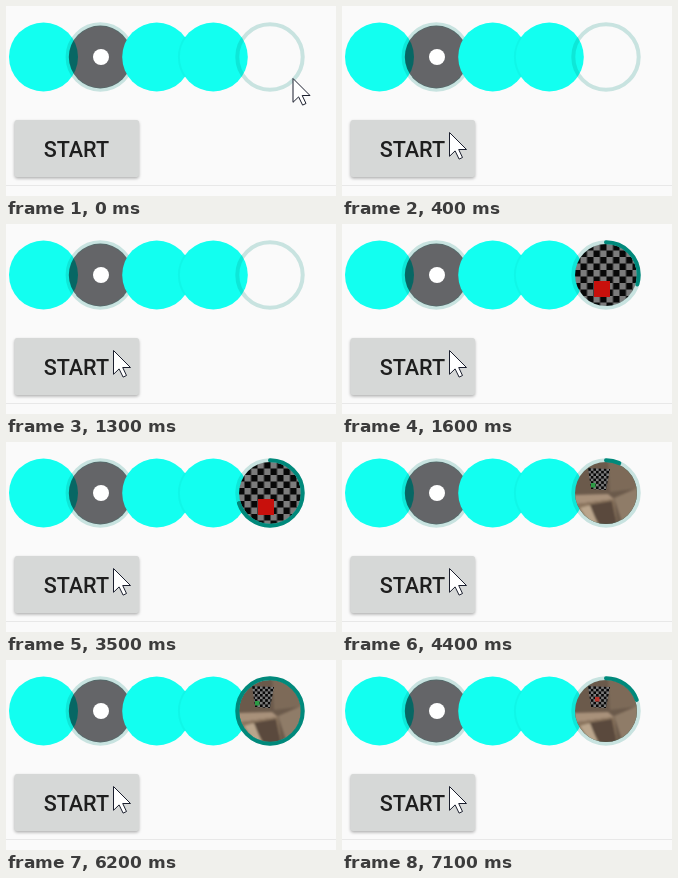
Write an HTML page that moves like this. It is 330 px wide and 190 px high and loops after 8 s.

```html
<!DOCTYPE html>
<html lang="en">
<head>
<meta charset="utf-8">
<style>
  html, body { margin: 0; width: 100%; height: 100%; overflow: hidden; background: #fafafa; }
  svg { display: block; width: 330px; height: 190px; }
  .cyan { fill: #12fff0; }
  .track { fill: none; stroke: #00897b; stroke-opacity: .2; stroke-width: 4; }
  text { font: 500 21.6px Roboto, sans-serif; fill: #1e1e1e; }
</style>
</head>
<body>
<svg viewBox="0 0 330 190">
  <defs>
    <pattern id="checker" x="238.5" y="20" width="13" height="13" patternUnits="userSpaceOnUse">
      <path fill="#080808" d="M0 0h13v13h-13z"/>
      <path fill="#7c7c7c" d="M0 0h6.5v6.5h-6.5zM6.5 6.5h6.5v6.5h-6.5z"/>
    </pattern>
    <pattern id="mesh" href="#checker" patternTransform="scale(.4)"/>
    <clipPath id="disc"><circle cx="264" cy="51" r="31"/></clipPath>
    <clipPath id="face"><rect x="8.5" y="114" width="124.5" height="57" rx="2.5"/></clipPath>
    <filter id="blur"><feGaussianBlur stdDeviation="1.4"/></filter>
    <filter id="soft"><feGaussianBlur stdDeviation=".8"/></filter>
  </defs>

  <path d="M0 179.5H330" stroke="#e8e8e8"/>

  <circle class="cyan" cx="37.5" cy="51" r="34.5"/>
  <circle cx="94.3" cy="51" r="31.5" fill="#000308" fill-opacity=".6"/>
  <circle class="track" cx="94.3" cy="51" r="32.7"/>
  <circle cx="95" cy="51" r="8" fill="#fff"/>
  <circle class="cyan" cx="150.7" cy="51" r="34.5"/>
  <circle class="cyan" cx="207.3" cy="51" r="34.5"/>
  <path d="M179.3 31A34.5 34.5 0 0 0 179.3 71" fill="none" stroke="#00897b" stroke-opacity=".07" stroke-width="2"/>

  <g clip-path="url(#disc)">
    <g id="board">
      <rect x="232" y="19" width="65" height="65" fill="url(#checker)"/>
      <rect x="252" y="57" width="16" height="16" fill="#c8100c"/>
    </g>
    <g id="room">
      <path fill="#6b5a4b" d="M230 16h70v70h-70z"/>
      <g filter="url(#soft)">
        <path fill="#7d6a59" d="M266 16h34v30l-32 4z"/>
        <path fill="#a8917a" d="M228 53l38-1 6 5-44 6z"/>
        <path fill="#8c765f" d="M228 63l44-6 4 30h-48z"/>
        <path fill="#8f7b67" d="M272 56l28-12v42h-18z"/>
        <path fill="#5a4a3c" d="M246 63l24-4 6 28h-16z"/>
        <path fill="#baa58c" d="M238 66l10-3 8 20h-7z"/>
      </g>
      <path fill="url(#mesh)" d="M246 26l22 1-4 21-15-1z"/>
      <rect id="dot" width="4.5" height="4.5"/>
    </g>
  </g>
  <circle class="track" cx="264" cy="51" r="32.7"/>
  <circle id="arc" cx="264" cy="51" r="32.7" fill="none" stroke="#00897b" stroke-width="4"
          stroke-linecap="round" pathLength="360" transform="rotate(-90 264 51)"/>

  <rect id="shadow" x="8.5" y="115.5" width="124.5" height="57" rx="3" filter="url(#blur)"/>
  <g clip-path="url(#face)">
    <rect x="8" y="114" width="126" height="58" fill="#d6d8d7"/>
    <circle id="ripple" cx="108" cy="127" fill="#bec0bf"/>
  </g>
  <text x="37.8" y="150.5">START</text>

  <path id="cursor" d="M0 0V23.8L5.6 18.4L9.6 26.6L13 25L9.2 17H17Z" fill="#fff" stroke="#1b1f2e" stroke-linejoin="round"/>
</svg>
<script>
const el = id => document.getElementById(id);
const set = (id, attrs) => {
  for (const name in attrs) el(id).setAttribute(name, attrs[name]);
};
const show = (id, visible) => el(id).style.display = visible ? '' : 'none';
const LOOP = 8000;

// Start time in ms and sweep in degrees of each progress update
const updates = [[0, 0], [1600, 107], [2500, 163], [3500, 252],
                 [4400, 24], [5300, 180], [6200, 360], [7100, 70]];

function draw(time) {
  const t = Math.floor(time % LOOP / 100) * 100;

  const move = Math.min(t / 400, 1);
  const eased = move * move * (3 - 2 * move);
  set('cursor', { transform: `translate(${287 - 179.5 * eased} ${72.5 + 54 * eased})` });

  const pressed = t >= 700 && t < 1300;
  const strength = pressed ? Math.min(1, (1300 - t) / 500) : 0;
  set('ripple', { r: t < 800 ? 50 : 130, opacity: strength });
  set('shadow', { 'fill-opacity': .3 + .12 * strength, transform: `translate(0 ${strength})` });

  const sweep = updates.findLast(([start]) => t >= start)[1];
  set('arc', { 'stroke-dasharray': `${sweep} 360` });
  show('arc', sweep > 0);
  show('board', t >= 1600 && t < 4400);
  show('room', t >= 4400);
  set('dot', t < 7100 ? { x: 249, y: 41, fill: '#2c9a45' } : { x: 253, y: 37, fill: '#b8342c' });
}

function frame() {
  draw(performance.now());
  requestAnimationFrame(frame);
}
frame();
</script>
</body>
</html>
```
